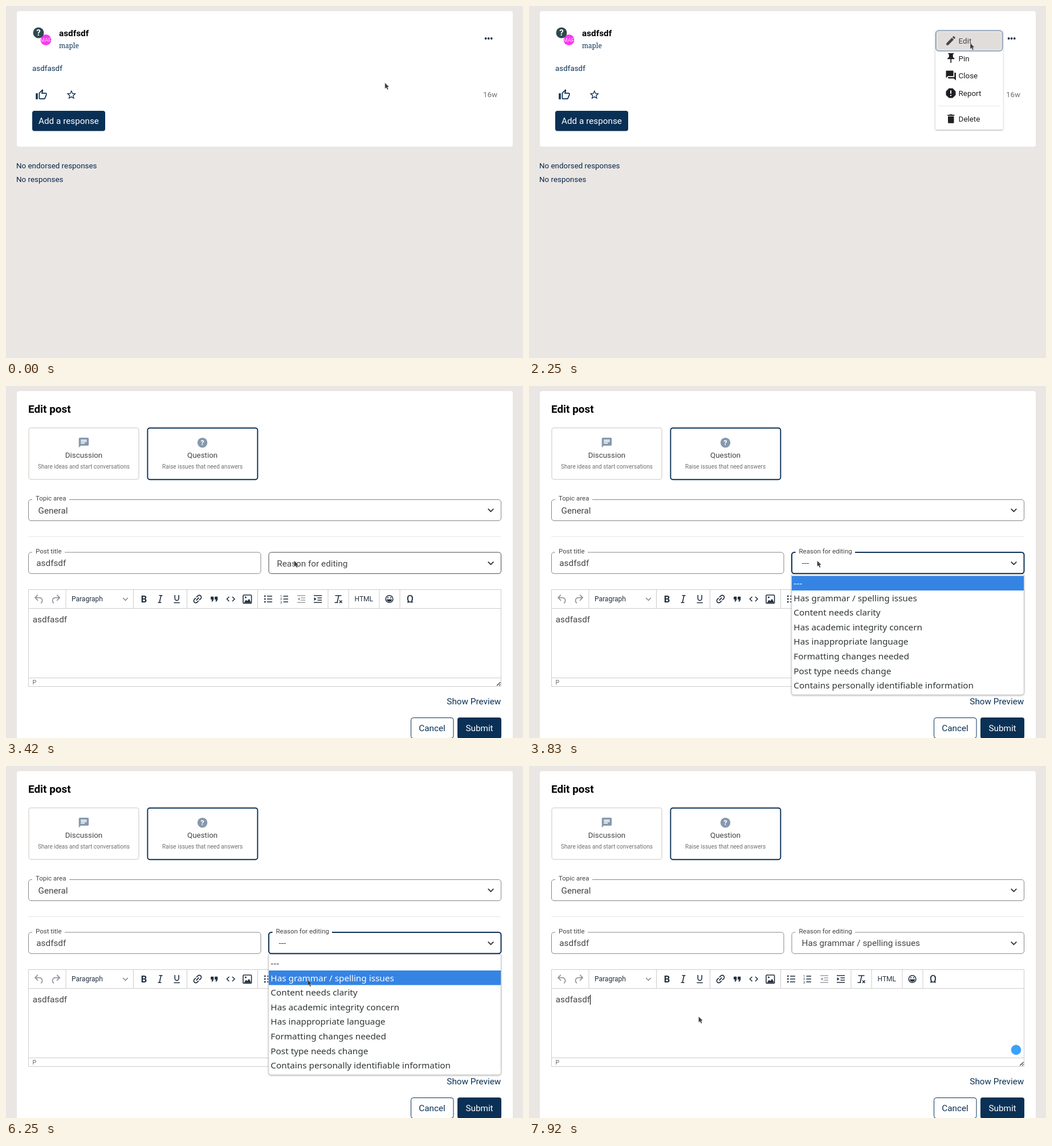
Write an HTML page that moves like this. It is 907 px wide and 618 px high and loops after 8 s.

```html
<!DOCTYPE html>
<html lang="en">
<head>
<meta charset="utf-8">
<title>Edit post</title>
<style>
  html, body { margin: 0; width: 100%; height: 100%; overflow: hidden; background: #eae6e3; }
  svg { display: block; font: 13.4px Roboto, sans-serif; }
  .big { font-size: 15.3px; }
  .label { font-size: 11.5px; fill: #454545; }
  .tiny { font-size: 10.1px; fill: #707070; }
  .bold { font-weight: 700; }
  .mid { text-anchor: middle; }
  .navy { fill: #0a3055; }
  .gray { fill: #454545; }
  .white { fill: #fff; }
  .field { fill: #fff; stroke: #858585; }
  .line { fill: none; stroke: #222f3e; stroke-width: 1.6; }
  .rule { fill: none; stroke: #ccc; }
  .chevron { fill: none; stroke: #333; stroke-width: 1.8; }
  #options { font: 15.3px "Noto Sans", sans-serif; }
</style>
</head>
<body>
<svg width="907" height="618" viewBox="0 0 907 618">
  <defs>
    <filter id="shadow" x="-10%" y="-10%" width="120%" height="120%">
      <feDropShadow dx="0" dy="1" stdDeviation="1.6" flood-opacity=".35"/>
    </filter>
    <clipPath id="avatar"><circle cx="70" cy="59.5" r="9.5"/></clipPath>
    <path id="chevron" class="chevron" d="M-4.8-2.4 0 2.4 4.8-2.4"/>
    <path id="undo" d="M6.4 8H12c3.7 0 6.2 2 6.8 5.1.6 2.7-.4 5.6-2.3 6.8a1 1 0 01-1-1.8c1.1-.6 1.8-2.7 1.4-4.6-.5-2.1-2.1-3.5-4.9-3.5H6.4l3.3 3.3a1 1 0 11-1.4 1.4l-5-5a1 1 0 010-1.4l5-5a1 1 0 011.4 1.4L6.4 8z"/>
    <path id="indented" d="M-7-6H7M-.5-2H7M-.5 2H7M-7 6H7"/>
  </defs>

  <g id="post">
    <rect x="19" y="9" width="870" height="238" rx="4" class="white"/>
    <circle cx="70" cy="59.5" r="9.5" fill="#fb37f1"/>
    <text x="70" y="63" class="mid" font-size="9.6" fill="#ffd3fb" clip-path="url(#avatar)">MAP</text>
    <circle cx="57" cy="47" r="9.5" fill="#2d494e"/>
    <text x="57" y="52.4" class="mid bold white" font-size="15">?</text>
    <text x="93" y="53" class="big bold">asdfsdf</text>
    <text x="93" y="73.5" class="navy" style="font:11.7px 'Noto Serif',serif">maple</text>
    <text x="46" y="114" class="navy">asdfasdf</text>
    <path class="navy" transform="translate(51.4 145.3) scale(.88)" d="M9 21h9c.83 0 1.54-.5 1.84-1.22l3.02-7.05c.09-.23.14-.47.14-.73v-2c0-1.1-.9-2-2-2h-6.31l.95-4.57.03-.32c0-.41-.17-.79-.44-1.06L14.17 1 7.58 7.59C7.22 7.95 7 8.45 7 9v10c0 1.1.9 2 2 2zM9 9l4.34-4.34L12 10h9v2l-3 7H9V9zM1 9h4v12H1V9z"/>
    <path class="navy" transform="translate(104.8 145.8) scale(.83)" d="M22 9.24l-7.19-.62L12 2 9.19 8.63 2 9.24l5.46 4.73L5.82 21 12 17.27 18.18 21l-1.63-7.03L22 9.24zM12 15.4l-3.76 2.27 1-4.28-3.32-2.88 4.38-.38L12 6.1l1.71 4.04 4.38.38-3.32 2.88 1 4.28L12 15.4z"/>
    <text x="837" y="160" fill="#707070">16w</text>
    <rect x="46" y="184" width="128" height="35.5" rx="4" class="navy"/>
    <text x="110" y="207.3" class="big mid white">Add a response</text>
    <text x="18" y="284.8" fill="#08264a">No endorsed responses</text>
    <text x="18" y="308.6" fill="#08264a">No responses</text>
    <circle id="moreHover" cx="846.3" cy="57" r="15.5" class="navy"/>
    <g id="more">
      <circle cx="841.6" cy="57" r="1.9"/><circle cx="846.6" cy="57" r="1.9"/><circle cx="851.7" cy="57" r="1.9"/>
    </g>

    <g id="menu" fill="#1f1f23">
      <rect x="713" y="42.5" width="118.5" height="174.5" rx="2" class="white" filter="url(#shadow)"/>
      <g id="pressed">
        <rect x="714" y="43.2" width="116.5" height="35.6" rx="5" fill="#fff" stroke="#8fa2b8" stroke-width="2"/>
        <rect x="716" y="45.2" width="112.5" height="31.6" rx="2" fill="#e1dddb"/>
      </g>
      <g id="edit">
        <path transform="translate(729.6 50.4) scale(.87)" d="M3 17.25V21h3.75L17.81 9.94l-3.75-3.75L3 17.25zM20.71 7.04c.39-.39.39-1.02 0-1.41l-2.34-2.34c-.39-.39-1.02-.39-1.41 0l-1.83 1.83 3.75 3.75 1.83-1.83z"/>
        <text x="753.6" y="65.7">Edit</text>
      </g>
      <path transform="translate(729.8 81) scale(.87)" d="M16 9V4h1c.55 0 1-.45 1-1s-.45-1-1-1H7c-.55 0-1 .45-1 1s.45 1 1 1h1v5c0 1.66-1.34 3-3 3v2h5.97v7l1 1 1-1v-7H19v-2c-1.66 0-3-1.34-3-3z"/>
      <text x="753.6" y="96.5">Pin</text>
      <path transform="translate(729.8 111.7) scale(.87)" d="M21 6h-2v9H6v2c0 .55.45 1 1 1h11l4 4V7c0-.55-.45-1-1-1zm-4 6V3c0-.55-.45-1-1-1H3c-.55 0-1 .45-1 1v14l4-4h10c.55 0 1-.45 1-1z"/>
      <text x="753.6" y="127">Close</text>
      <path d="M736.7 145h6.6l4.7 4.7v6.6l-4.7 4.7h-6.6l-4.7-4.7v-6.6z" stroke="#1f1f23" stroke-linejoin="round"/>
      <path d="M740 148.3v5.6M740 156v2" stroke="#fff" stroke-width="1.9"/>
      <text x="753.6" y="157.8">Report</text>
      <path d="M717 175.5H827" stroke="#eae6e5"/>
      <path transform="translate(729.8 187.6) scale(.87)" d="M6 19c0 1.1.9 2 2 2h8c1.1 0 2-.9 2-2V7H6v12zM19 4h-3.5l-1-1h-5l-1 1H5v2h14V4z"/>
      <text x="753.6" y="202.7">Delete</text>
    </g>
  </g>

  <g id="editor">
    <path d="M19 618V13a4 4 0 0 1 4-4H885a4 4 0 0 1 4 4V618z" class="white"/>
    <text x="39" y="46.7" class="bold" font-size="18.9">Edit post</text>

    <rect x="40" y="73.5" width="193" height="90.5" rx="4" fill="#fff" stroke="#dcd8d6" stroke-width="1.5"/>
    <path fill="#8598ad" transform="translate(126 89) scale(.87)" d="M20 2H4c-1.1 0-1.99.9-1.99 2L2 22l4-4h14c1.1 0 2-.9 2-2V4c0-1.1-.9-2-2-2zM6 9h12v2H6V9zm8 5H6v-2h8v2zm4-6H6V6h12v2z"/>
    <text x="136.5" y="126.4" class="mid gray">Discussion</text>
    <text x="136.5" y="145" class="mid tiny">Share ideas and start conversations</text>

    <rect x="248.4" y="73.7" width="193" height="90.5" rx="4" fill="#fff" stroke="#0a3055" stroke-width="1.9"/>
    <circle cx="344.6" cy="99.5" r="8.7" fill="#8598ad"/>
    <text x="344.6" y="104.3" class="mid bold white" font-size="13">?</text>
    <text x="344.6" y="126.4" class="mid gray">Question</text>
    <text x="344.6" y="145" class="mid tiny">Raise issues that need answers</text>

    <rect x="39.5" y="199.5" width="829" height="37" rx="4.5" class="field"/>
    <path d="M46 199.5H111" stroke="#fff" stroke-width="3"/>
    <text x="52" y="201.2" class="label">Topic area</text>
    <text x="56.5" y="223.6" class="big gray">General</text>
    <use href="#chevron" x="850.5" y="218"/>
    <path d="M39 264.5H868" stroke="#eae6e5"/>

    <rect x="39.5" y="292" width="407.5" height="37.3" rx="4.5" class="field"/>
    <path d="M46 292H103" stroke="#fff" stroke-width="3"/>
    <text x="52" y="293.8" class="label">Post title</text>
    <text x="53.3" y="316.4" class="big gray">asdfsdf</text>

    <rect id="reason" x="461" y="292" width="407.5" height="37.3" rx="4.5" fill="#fff"/>
    <path id="notch" d="M467.5 292H572" stroke="#fff" stroke-width="3"/>
    <text id="reasonLabel" class="gray">Reason for editing</text>
    <text id="reasonValue" x="478.5" y="316.4" class="big gray"></text>
    <use href="#chevron" x="850.5" y="311"/>

    <path class="rule" d="M39.5 357.5H868.5V527.5H39.5zM39.5 390.5H868.5M39.5 512.5H868.5M105 358V390M223.5 358V390M317.5 358V390M441.5 358V390M565 358V390M601 358V390M655 358V390M691 358V390"/>
    <g fill="#8f969e">
      <use href="#undo" transform="translate(47.4 363.6) scale(.9)"/>
      <use href="#undo" transform="translate(97.8 363.6) scale(-.9 .9)"/>
    </g>
    <g fill="#222f3e">
      <text x="115" y="378.2" font-size="12">Paragraph</text>
      <text x="242" y="380" class="mid bold" font-size="16.5">B</text>
      <text x="611.5" y="378.2" font-size="12">HTML</text>
      <text x="709" y="380.2" class="mid" font-size="18" stroke="#222f3e" stroke-width=".4">Ω</text>
      <path transform="translate(336 374) rotate(-45) scale(.87) translate(-12 -12)" d="M3.9 12c0-1.71 1.39-3.1 3.1-3.1h4V7H7c-2.76 0-5 2.24-5 5s2.24 5 5 5h4v-1.9H7c-1.71 0-3.1-1.39-3.1-3.1zM8 13h8v-2H8v2zm9-6h-4v1.9h4c1.71 0 3.1 1.39 3.1 3.1s-1.39 3.1-3.1 3.1h-4V17h4c2.76 0 5-2.24 5-5s-2.24-5-5-5z"/>
      <path transform="translate(354.8 363.6) scale(.87)" d="M7.5 17h.9c.4 0 .7-.2.9-.6L11 13V8c0-.6-.4-1-1-1H6a1 1 0 00-1 1v4c0 .6.4 1 1 1h2l-1.3 2.7a1 1 0 00.8 1.3zm8 0h.9c.4 0 .7-.2.9-.6L19 13V8c0-.6-.4-1-1-1h-4a1 1 0 00-1 1v4c0 .6.4 1 1 1h2l-1.3 2.7a1 1 0 00.8 1.3z"/>
      <path d="M417.5 380.5l3.5-5 2.5 2 3-4 3.5 7z"/>
      <circle cx="420.5" cy="371" r="1.5"/>
      <circle cx="454.3" cy="369" r="1.4"/><circle cx="454.3" cy="374" r="1.4"/><circle cx="454.3" cy="379" r="1.4"/>
      <g font-size="6"><text x="481" y="371">1</text><text x="481" y="376.3">2</text><text x="481" y="381.6">3</text></g>
      <path d="M540.5 371l4 3-4 3z"/>
      <circle cx="670" cy="371.7" r="1.1"/><circle cx="675" cy="371.7" r="1.1"/>
      <path d="M668 374.5h9a4.5 4.3 0 0 1-9 0z"/>
      <path d="M517-3" />
    </g>
    <path d="M515.5 371l-4 3 4 3z" fill="#999fa6"/>
    <g class="line">
      <path d="M205.2 372l4.3 4.3 4.3-4.3" stroke="#6b747e" stroke-width="1.2"/>
      <path d="M268.5 367.8h6M266.5 380.2h6M272 367.8l-2.8 12.4"/>
      <path d="M296.3 367v6a3.4 3.6 0 0 0 6.8 0v-6M294.5 380.5h10.4"/>
      <path d="M391.5 370l-4 4 4 4M397 370l4 4-4 4"/>
      <rect x="416" y="367" width="14.6" height="14.4" rx="1.2"/>
      <path d="M458 369h9M458 374h9M458 379h9M486.5 369h8.5M486.5 374h8.5M486.5 379h8.5"/>
      <use href="#indented" x="518" y="374" stroke="#999fa6"/>
      <use href="#indented" x="547" y="374"/>
      <path d="M577.5 368h11M583.8 368l-2.7 11.5M576.5 380.3h6M585 376.5l4.5 4.5M589.5 376.5l-4.5 4.5"/>
      <circle cx="672.5" cy="374" r="6.3"/>
      <path d="M861 526l6.5-6M865 526l2.5-2.3" stroke-width="1.1"/>
    </g>
    <text x="46.8" y="415.4" class="big gray">asdfasdf</text>
    <text x="46.5" y="523.7" font-size="10.5" fill="#5c6670">P</text>
    <path id="caret" d="M107.5 401.5V419" stroke="#000"/>
    <circle id="helper" cx="854.5" cy="498.4" r="8.8" fill="#3ba2f8"/>

    <text x="868.3" y="558.7" class="big navy" text-anchor="end">Show Preview</text>
    <rect x="710.5" y="582.5" width="74.5" height="36" rx="4" fill="#fff" stroke="#0a3055"/>
    <text x="747.5" y="606" class="big mid navy">Cancel</text>
    <rect x="792" y="582" width="77" height="37" rx="4" class="navy"/>
    <text x="830.5" y="606" class="big mid white">Submit</text>

    <g id="dropdown">
      <path d="M460.8 331H868.3V538a4 4 0 0 1-4 4H464.8a4 4 0 0 1-4-4z" fill="#fff" stroke="#c4c4c4" stroke-width=".8" filter="url(#shadow)"/>
      <rect id="highlight" x="461" width="407" height="25.6" fill="#3584e4"/>
      <g id="options"></g>
    </g>
  </g>

  <path id="cursor" d="M0 0V10.6L2.4 8.6 4.3 12.4 6.2 11.5 4.4 7.9 7.4 7.4z" fill="#3d3d3d" stroke="#fff" stroke-opacity=".6" stroke-width=".6"/>
</svg>

<script>
const $ = id => document.getElementById(id);
const show = (id, on) => $(id).style.display = on ? '' : 'none';
const set = (id, attrs) => { for (const k in attrs) $(id).setAttribute(k, attrs[k]); };
const clamp = (v, lo, hi) => Math.min(hi, Math.max(lo, v));

const LOOP = 8000, RATE = 12;          // ms, steps per second
const ROW_TOP = 333.4, ROW_HEIGHT = 25.6;
const reasons = ['---', 'Has grammar / spelling issues', 'Content needs clarity',
  'Has academic integrity concern', 'Has inappropriate language', 'Formatting changes needed',
  'Post type needs change', 'Contains personally identifiable information'];

const options = reasons.map((reason, i) => {
  const text = document.createElementNS('http://www.w3.org/2000/svg', 'text');
  text.textContent = reason;
  text.setAttribute('x', 464.3);
  text.setAttribute('y', ROW_TOP + ROW_HEIGHT * i + 18.6);
  return $('options').appendChild(text);
});

// Pointer moves: first step, last step, x and y reached
const start = [664.7, 134.7];
const moves = [
  [5, 12, 850, 65], [17, 19, 774, 65], [34, 41, 505.5, 306.5], [51, 55, 525, 509],
  [59, 61, 530, 460], [62, 66, 526, 404], [68, 70, 525, 385], [72, 75, 529, 375], [88, 93, 297.5, 439.7]
];

function pointer(step) {
  let [x, y] = start;
  for (const [first, last, toX, toY] of moves) {
    const p = clamp((step - first + 1) / (last - first + 1), 0, 1);
    const eased = p * p * (3 - 2 * p);
    x += (toX - x) * eased;
    y += (toY - y) * eased;
  }
  return [x, y];
}

function draw(step) {
  const [x, y] = pointer(step);
  set('cursor', { transform: `translate(${x} ${y})` });

  const editing = step >= 28;
  show('post', !editing);
  show('editor', editing);

  const overMore = step < 14 && x > 833 && y < 73;
  show('moreHover', overMore);
  set('more', { fill: overMore ? '#fff' : '#0a3055' });
  show('menu', step >= 14);
  show('pressed', step >= 24);
  set('edit', { fill: step >= 24 ? '#454545' : '#1f1f23' });

  const focused = step >= 43 && step < 94;
  const hovered = step < 43 && x > 461 && x < 868 && y > 292 && y < 329;
  set('reason', {
    stroke: focused ? '#0a3055' : hovered ? '#454545' : '#858585',
    'stroke-width': focused ? 2 : 1
  });
  const lift = clamp((step - 42) / 3, 0, 1);
  set('reasonLabel', { x: 475.3 - 1.8 * lift, y: 316.8 - 23 * lift, 'font-size': 15.3 - 3.8 * lift });
  show('notch', lift > .5);
  $('reasonValue').textContent = step < 46 ? '' : reasons[step < 87 ? 0 : 1];

  show('dropdown', step >= 46 && step < 87);
  // The highlight trails the pointer by one step
  const row = clamp(Math.floor((pointer(step - 1)[1] - ROW_TOP) / ROW_HEIGHT), 0, 7);
  set('highlight', { y: ROW_TOP + ROW_HEIGHT * row });
  options.forEach((text, i) => text.setAttribute('fill', i === row ? '#fff' : '#2e3436'));

  show('caret', step >= 94);
  show('helper', step >= 94);
}

const begin = performance.now();
function tick() {
  const t = Math.max(0, performance.now() - begin) % LOOP;
  draw(Math.floor((t + 5) * RATE / 1000) % (LOOP * RATE / 1000));
  requestAnimationFrame(tick);
}
tick();
</script>
</body>
</html>
```
